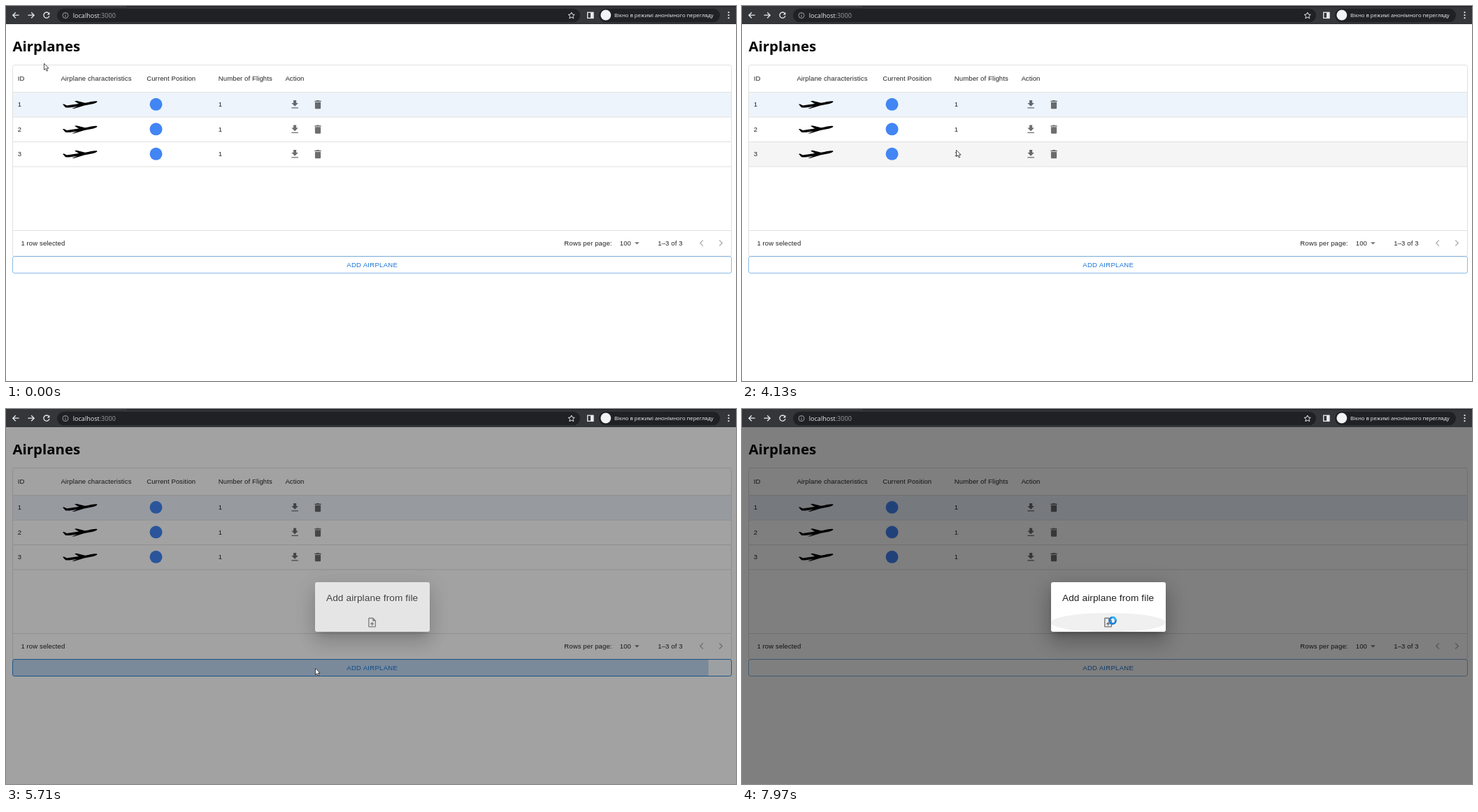
Animation, 1044 px wide and 537 px high, one loop 8 s. Source, as an HTML page:

```html
<!DOCTYPE html>
<html lang="en">
<head>
<meta charset="utf-8">
<title>Airplanes</title>
<style>
  html, body { margin: 0; width: 100%; height: 100%; overflow: hidden; background: #fff; }
  svg { display: block; width: 1044px; height: 537px; }
  text { font: 9.56px "Liberation Sans", Arial, sans-serif; letter-spacing: .102px; fill: rgba(0,0,0,.87); }
  .ui { font-family: "Open Sans", "Noto Sans", sans-serif; letter-spacing: 0; }
  .tip text { font-size: 7.51px; letter-spacing: 0; fill: #fff; }
  .paper { width: 164px; height: 71px; border-radius: 2.7px; background: #fff;
    box-shadow: 0 7.5px 10px -4.8px rgba(0,0,0,.2), 0 16.4px 26px 2px rgba(0,0,0,.14), 0 6px 31px 5.5px rgba(0,0,0,.12); }
</style>
</head>
<body>
<svg viewBox="0 0 1044 537" xmlns="http://www.w3.org/2000/svg">
  <defs>
    <clipPath id="buttonClip"><rect x="9.5" y="358.5" width="1028" height="24" rx="2.7"/></clipPath>
    <clipPath id="ellipseClip"><ellipse cx="523.8" cy="305.7" rx="82" ry="13.7"/></clipPath>
    <path id="plane" d="M81 5.3 83 5.1 87 7.1 104 4.5 98 .7 101 .3 113 3.3C120 1.7 126 .3 129.5.7 132 1.4 129 3.3 125 4.5L112 7 98 11.3 94 11.5 102 8.4C95 9.5 88 10.3 85 9.7Z"/>
    <path id="download" d="M5 20h14v-2H5v2zM19 9h-4V3H9v6H5l7 7 7-7z"/>
    <path id="trash" d="M6 19c0 1.1.9 2 2 2h8c1.1 0 2-.9 2-2V7H6v12zM19 4h-3.5l-1-1h-5l-1 1H5v2h14V4z"/>
  </defs>

  <rect width="1044" height="537" fill="#fff"/>

  <text class="ui" x="9.5" y="64.5" style="font-size:20.4px;font-weight:700;fill:#000">Airplanes</text>

  <g id="rows"></g>
  <g fill="none" stroke="#e0e0e0">
    <rect x="9.5" y="84.5" width="1028" height="274" rx="2.7"/>
    <path d="M10 123.5H1037M10 159H1037M10 194.5H1037M10 230H1037M10 321.5H1037"/>
  </g>
  <g id="heads"></g>
  <g id="headTools" fill="#000">
    <path d="M37.2 108.5V101.4L34 104.6 33 103.7 38 98.7 43 103.7 42 104.6 38.8 101.4V108.5Z" fill-opacity=".3"/>
    <path d="M60 99.3h1.6v1.6H60zM60 102.8h1.6v1.6H60zM60 106.3h1.6v1.6H60z" fill-opacity=".5"/>
  </g>

  <text x="21.4" y="343">1 row selected</text>
  <text x="798.3" y="343">Rows per page:</text>
  <text x="877.8" y="343">100</text>
  <path d="M899 338.2h6.8l-3.4 3.4z" fill="#757575"/>
  <text x="932.3" y="343">1–3 of 3</text>
  <g fill="none" stroke="#a8a8a8" stroke-width="1.3">
    <path d="M996.8 335.4 992.8 339.5 996.8 343.6M1020.2 335.4 1024.2 339.5 1020.2 343.6"/>
  </g>

  <rect id="button" x="9.5" y="358.5" width="1028" height="24" rx="2.7" fill="#1976d2" stroke="#1976d2"/>
  <g clip-path="url(#buttonClip)"><circle id="ripple" cx="442" cy="371" fill="#1976d2"/></g>
  <text x="523.7" y="373.6" text-anchor="middle" style="letter-spacing:.273px;fill:#1976d2">ADD AIRPLANE</text>

  <g id="planeTip" class="tip"></g>
  <g id="pinTip" class="tip"></g>

  <rect id="backdrop" y="26" width="1044" height="511"/>
  <g id="dialog">
    <foreignObject x="342" y="148" width="364" height="290">
      <div xmlns="http://www.w3.org/1999/xhtml" class="paper" style="margin:100px"></div>
    </foreignObject>
    <text x="523.6" y="275" text-anchor="middle" style="font-size:13.66px">Add airplane from file</text>
    <g clip-path="url(#ellipseClip)">
      <rect id="iconHover" x="441" y="291" width="166" height="29"/>
      <circle id="iconRipple" cx="523.8" cy="305.7" fill="#757575"/>
    </g>
    <path transform="translate(515.4 297.5) scale(.683)" fill="#757575" d="M14 2H6c-1.1 0-1.99.9-1.99 2L4 20c0 1.1.89 2 1.99 2H18c1.1 0 2-.9 2-2V8l-6-6zm4 18H6V4h7v5h5v11zM8 15.01l1.41 1.41L11 14.84V19h2v-4.16l1.59 1.59L16 15.01 12.01 11z"/>
  </g>

  <!-- browser toolbar -->
  <g>
    <rect width="1044" height="26" fill="#35363a"/>
    <rect x="172" width="872" height="1.3" fill="#202124"/>
    <rect x="73" y="3.7" width="748" height="19.6" rx="9.8" fill="#202124"/>
    <rect x="848" y="3.7" width="173" height="19.6" rx="9.8" fill="#202124"/>
    <g fill="none" stroke="#e8eaed" stroke-width="1.3">
      <path d="M18.6 13.2H10M13.8 9.2 9.8 13.2 13.8 17.2M31.4 13.2H40M36.2 9.2 40.2 13.2 36.2 17.2"/>
      <path d="M61.3 10.6A4.1 4.1 0 1 0 62 14.2"/>
      <path d="M808.7 9 810.1 12 813.2 12.3 810.9 14.5 811.5 17.7 808.7 16.1 805.9 17.7 806.5 14.5 804.2 12.3 807.3 12Z" stroke-width="1"/>
      <rect x="831.7" y="9.2" width="8.2" height="8.2"/>
    </g>
    <path d="M62.4 8.8V12.4H58.8ZM836 9h4.2v8.6H836z" fill="#e8eaed"/>
    <circle cx="85" cy="13.5" r="4" fill="none" stroke="#9aa0a6"/>
    <path d="M84.5 11.1h1v1h-1zM84.5 13h1v2.8h-1z" fill="#9aa0a6"/>
    <text class="ui" x="95.8" y="16.8" style="font-size:9.05px;fill:#e8eaed">localhost<tspan fill="#9aa0a6">:3000</tspan></text>
    <circle cx="857.8" cy="13" r="7.4" fill="#f1f3f4"/>
    <text class="ui" x="870" y="16" style="font-size:7.7px;fill:#f1f3f4">Вікно в режимі анонімного перегляду</text>
    <g fill="#e8eaed"><circle cx="1033.5" cy="9.2" r="1.1"/><circle cx="1033.5" cy="13.2" r="1.1"/><circle cx="1033.5" cy="17.2" r="1.1"/></g>
  </g>

  <path id="arrow" d="M.5.3V9.6L2.6 7.7 4.1 11.2 5.7 10.5 4.2 7.1H7.1Z" fill="#fff" stroke="#222" stroke-width=".8"/>
  <g id="busy" fill="none">
    <circle r="4.5" stroke="#1583dd" stroke-width="2.8"/>
    <path d="M0-4.5A4.5 4.5 0 0 1 4.5 0" stroke="#3cb4f5" stroke-width="2.8"/>
  </g>
</svg>
<script>
const LOOP = 8000;
const $ = id => document.getElementById(id);
const set = (id, attrs) => { for (const key in attrs) $(id).setAttribute(key, attrs[key]); };
const clamp = v => Math.min(1, Math.max(0, v));
const ramp = (t, start, length) => clamp((t - start) / length);
const smooth = p => p * p * (3 - 2 * p);

// cubic-bezier(.4, 0, .2, 1), solved by bisection
function ease(p) {
  if (p <= 0 || p >= 1) return clamp(p);
  let lo = 0, hi = 1, s = .5;
  for (let i = 0; i < 20; i++) {
    s = (lo + hi) / 2;
    const x = 1.2 * s * (1 - s) ** 2 + .6 * s * s * (1 - s) + s ** 3;
    if (x < p) lo = s; else hi = s;
  }
  return s * s * (3 - 2 * s);
}
const fade = (t, start, length) => ease(ramp(t, start, length));

const ROW_TOP = 123.5, ROW_HEIGHT = 35.5;
const heads = [[16.8, 'ID'], [78.4, 'Airplane characteristics'], [201.2, 'Current Position'],
  [303.8, 'Number of Flights'], [399.4, 'Action']];
$('heads').innerHTML = heads.map(([x, label]) => `<text x="${x}" y="107.2">${label}</text>`).join('');
$('rows').innerHTML = [1, 2, 3].map(n => `
  <g transform="translate(0 ${ROW_TOP + (n - 1) * ROW_HEIGHT})">
    <rect id="row${n}" x="10" width="1027" height="${ROW_HEIGHT}"/>
    <text x="16.8" y="20.5">${n}</text>
    <use href="#plane" y="12"/>
    <circle cx="214.5" cy="17.3" r="9" fill="#4285f4"/>
    <text x="303.8" y="20.5">1</text>
    <g fill="#000" fill-opacity=".57">
      <use href="#download" transform="translate(404.9 9.4) scale(.683)"/>
      <use href="#trash" transform="translate(437.8 9.4) scale(.683)"/>
    </g>
  </g>`).join('');

const tips = {
  planeTip: { x: 68, y: 168.6, width: 76.4, lines: ['max v: 3', 'max a: 0.1', 'altitude change: 0.1', 'course change: 90'] },
  pinTip: { x: 164, y: 164, width: 107, lines: ['latitude: 48.316270945', 'longitude: 27.40518263', 'altitude: 0', 'velocity: 0', 'course: 0'] }
};
for (const id in tips) {
  const { x, y, width, lines } = tips[id];
  $(id).innerHTML = `<rect x="${x}" y="${y}" width="${width}" height="${lines.length * 8.25 + 5.3}" rx="2.7" fill="#616161" fill-opacity=".92"/>`
    + lines.map((line, i) => `<text x="${x + 5}" y="${y + 9.1 + i * 8.25}">${line}</text>`).join('');
}

function showTip(id, opacity) {
  const { x, y, width } = tips[id], cx = x + width / 2;
  const sx = .75 + .25 * opacity, sy = .5625 + .4375 * opacity;
  set(id, { opacity, transform: `translate(${cx} ${y}) scale(${sx} ${sy}) translate(${-cx} ${-y})` });
}

// time, x, y, easing of the move that ends there
const path = [
  [80, 54, 82], [890, 117, 147, smooth], [1860, 117, 147], [2460, 220, 142, smooth],
  [3860, 220, 142], [4130, 306, 206], [4670, 433, 362], [5030, 442, 371, smooth],
  [6300, 442, 371], [6720, 527, 289, smooth], [6950, 530, 303, smooth]
];
function cursorAt(t) {
  const next = path.findIndex(point => point[0] > t);
  if (next === 0) return path[0].slice(1, 3);
  if (next < 0) return path[path.length - 1].slice(1, 3);
  const [t0, x0, y0] = path[next - 1], [t1, x1, y1, easing = p => p] = path[next];
  const p = easing((t - t0) / (t1 - t0));
  return [x0 + (x1 - x0) * p, y0 + (y1 - y0) * p];
}

function ripple(id, t, start, release, radius) {
  const grow = fade(t, start, 550);
  set(id, { r: radius * grow, opacity: t < start ? 0 : (.1 + .2 * grow) * (1 - fade(t, release, 550)) });
}

function draw(t) {
  const [x, y] = cursorAt(t);
  const busy = t >= 7600;
  set('arrow', { transform: `translate(${x} ${y})`, opacity: busy ? 0 : 1 });
  set('busy', { transform: `translate(${x} ${y}) rotate(${t * .36})`, opacity: busy ? 1 : 0 });

  const hovered = Math.floor((y - ROW_TOP) / ROW_HEIGHT) + 1;
  for (let n = 1; n <= 3; n++) {
    const over = n === hovered;
    set('row' + n, n === 1
      ? { fill: '#1976d2', 'fill-opacity': over ? .12 : .08 }
      : { fill: '#000', 'fill-opacity': over ? .04 : 0 });
  }
  set('headTools', { opacity: y > 85 && y < ROW_TOP && x < 71 ? 1 : 0 });

  showTip('planeTip', fade(t, 980, 240) * (1 - fade(t, 1960, 200)));
  showTip('pinTip', fade(t, 2440, 260) * (1 - fade(t, 3890, 200)));

  const buttonHover = fade(t, 4660, 250) * (1 - fade(t, 5650, 250));
  set('button', { 'fill-opacity': .04 * buttonHover, 'stroke-opacity': .5 + .5 * buttonHover });
  ripple('ripple', t, 5320, 5600, 597);

  const open = fade(t, 5605, 225);
  set('backdrop', { opacity: .5 * open });
  set('dialog', { opacity: open });
  set('iconHover', { opacity: .06 * fade(t, 6620, 150) });
  ripple('iconRipple', t, 7240, 7370, 67);
}

let begin;
function tick(now) {
  begin ??= now;
  draw((now - begin) % LOOP);
  requestAnimationFrame(tick);
}
draw(0);
requestAnimationFrame(tick);
</script>
</body>
</html>
```
